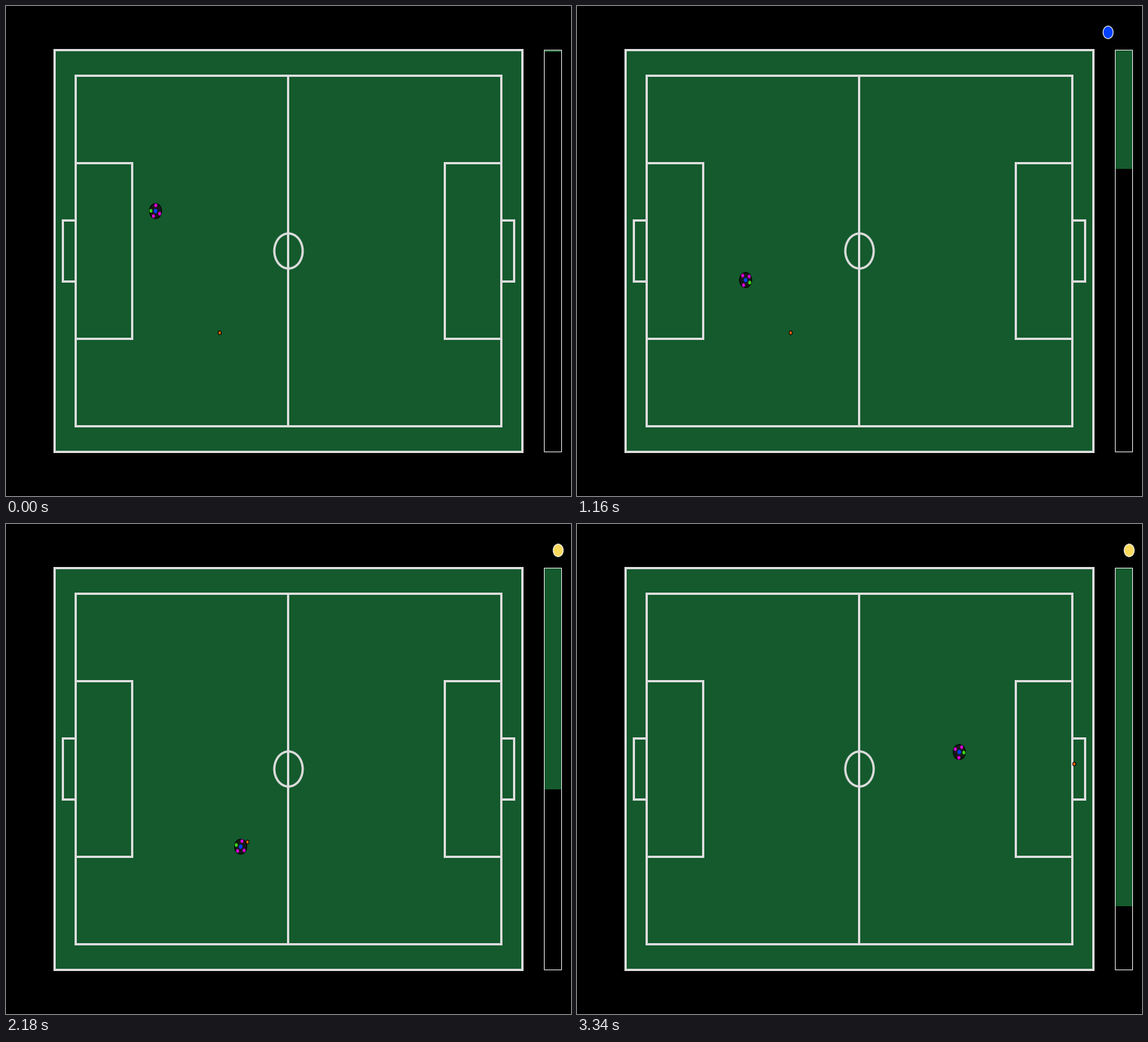
These frames come from a looping animation (750x650 px, 3.39 s). A matplotlib script:

```python
import numpy as np
import matplotlib.pyplot as plt
from matplotlib.animation import FuncAnimation
from matplotlib.patches import Ellipse, Rectangle

W, H, DPI = 750, 650, 100
PX = 72 / DPI                 # one pixel in points
SX, SY = 94.2, 116.2          # pixels per metre
CX, CY = W / 2, H / 2
TICK, STEPS, LOOP = 20, 168, 3390
INTERVAL = 10


def rgb(r, g, b):
    return r / 255, g / 255, b / 255


GRASS, LINE = rgb(20, 90, 45), rgb(220, 220, 220)
BODY, BALL = rgb(25, 25, 25), rgb(253, 106, 2)
BLUE, YELLOW = rgb(0, 64, 255), rgb(250, 218, 94)
PINK, GREEN = rgb(220, 0, 220), rgb(57, 220, 20)

# Key poses of the robot: step -> x, y, heading in degrees
POSES = {
    0: (198.5, 272, 30),
    38: (206, 305.5, 180),
    78: (251, 417.5, 148.5),
    109: (311.5, 428, 16),
    126: (375.5, 403, 22),
    147: (466, 343.5, 78),
    167: (507.5, 302.5, 207),
}
KEYS = np.array(list(POSES), float)
VALUES = np.array(list(POSES.values()), float)
SLOPES = np.gradient(VALUES, KEYS, axis=0)
SLOPES[0] = 0                 # starts from rest

TOUCH, KICK = 93, 126         # steps where the ball is caught and released
BALL_START = np.array([283.7, 433.5])
HELD = np.array([9, -6.2])    # ball relative to the robot while dribbling
TAGS = {57.4: PINK, -57.4: PINK, 147.4: GREEN, -147.4: PINK}


def pose(k):
    """Cubic Hermite curve through the key poses."""
    i = min(np.searchsorted(KEYS, k, side="right") - 1, len(KEYS) - 2)
    d = KEYS[i + 1] - KEYS[i]
    s = (k - KEYS[i]) / d
    ease = s * s * (3 - 2 * s)
    return (VALUES[i] * (1 - ease) + VALUES[i + 1] * ease
            + d * s * (1 - s) * ((1 - s) * SLOPES[i] - s * SLOPES[i + 1]))


def ball_at(k):
    if k <= TOUCH:
        return BALL_START
    if k <= KICK:
        caught = BALL_START - pose(TOUCH)[:2]
        s = min((k - TOUCH) / 14, 1)
        return pose(k)[:2] + caught + (HELD - caught) * s
    t = k - KICK
    run = 7.59 * t - 0.0212 * t * t      # rolling friction
    return pose(KICK)[:2] + HELD + run * np.array([1, -0.2845])


def lamps_at(k):
    """Blue and yellow lamp states."""
    blue = 32 <= k < 95
    yellow = k >= 1 and not blue and not 119 <= k < 139
    return blue, yellow


fig = plt.figure(figsize=(W / DPI, H / DPI), dpi=DPI, facecolor="black")
ax = fig.add_axes([0, 0, 1, 1])
ax.set_xlim(0, W)
ax.set_ylim(H, 0)
ax.axis("off")


def box(x0, y0, x1, y1, fill="none", edge=LINE, lw=3):
    return ax.add_patch(Rectangle((x0, y0), x1 - x0, y1 - y0, fc=fill,
                                  ec=edge, lw=lw * PX, joinstyle="miter"))


def oval(x, y, rx, ry, fill="none", edge="none", lw=0):
    return ax.add_patch(Ellipse((x, y), 2 * rx, 2 * ry, fc=fill, ec=edge,
                                lw=lw * PX))


def disc(radius, fill, **kw):
    return oval(0, 0, radius * SX, radius * SY, fill, **kw)


# Pitch
box(64, 58, 685, 591, GRASS)
box(92, 92, 657, 557)
for left, right, half in ((92, 167, 116.5), (582, 657, 116.5),
                          (75, 92, 40.5), (657, 674, 40.5)):
    box(left, CY - 0.5 - half, right, CY - 0.5 + half)
ax.plot([374, 374], [92, 557], color=LINE, lw=3 * PX, solid_capstyle="butt")
oval(CX, CY, 0.2 * SX, 0.2 * SY, edge=LINE, lw=3)

# Timer bar and lamps
bar = box(715, 58, 737, 58, GRASS, "none", 0)
box(714, 58, 737, 591, lw=1)
lamps = [oval(x, 35, 6.7, 8.3, c, "white", 1)
         for x, c in ((705, BLUE), (733, YELLOW))]

# Robot and ball
body = disc(0.086, BODY, edge="black", lw=1)
core = disc(0.025, BLUE)
tags = [disc(0.021, c) for c in TAGS.values()]
ball = disc(0.0215, BALL, edge="black", lw=1)


def draw(frame):
    k = min(frame * INTERVAL // TICK, STEPS - 1)
    x, y, heading = pose(k)
    body.center = core.center = (x, y)
    for tag, angle in zip(tags, TAGS):
        a = np.radians(heading + angle)
        tag.center = (x + 0.065 * SX * np.cos(a), y - 0.065 * SY * np.sin(a))
    ball.center = tuple(ball_at(k))
    bar.set_height((k + 1) * 2.67)
    for lamp, on in zip(lamps, lamps_at(k)):
        lamp.set_visible(on)
    return [bar, *lamps, body, core, *tags, ball]


anim = FuncAnimation(fig, draw, frames=LOOP // INTERVAL, interval=INTERVAL,
                     repeat=True, repeat_delay=0)
plt.show()
```
